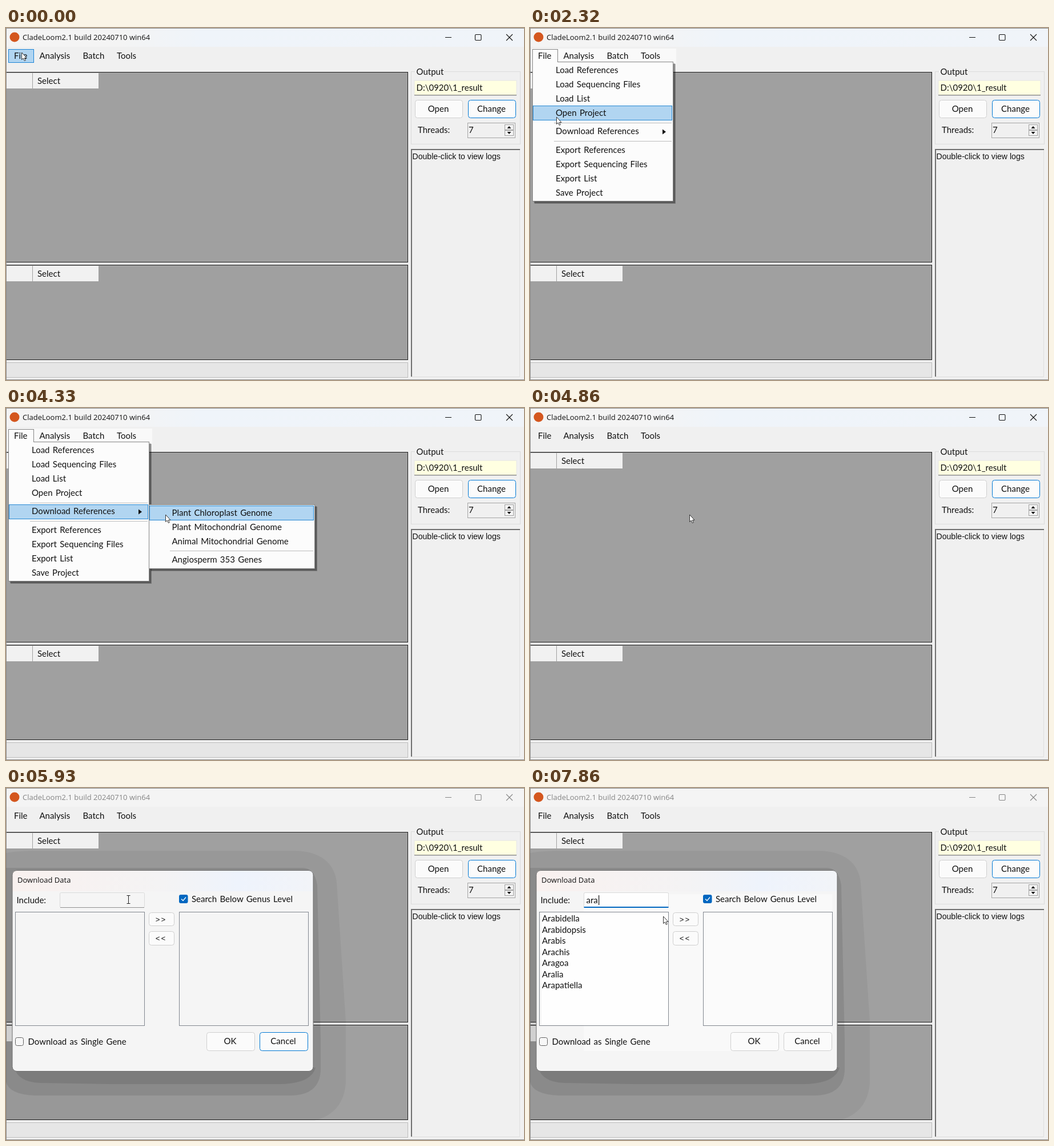
These frames come from a looping animation (907 px wide and 617 px high, 8 s). An HTML page:

```html
<!DOCTYPE html>
<html lang="en">
<head>
<meta charset="utf-8">
<title>Download dialog</title>
<style>
  html, body { margin: 0; width: 100%; height: 100%; overflow: hidden; background: #f0f0f0; }
  svg { display: block; }
  text { font: 15px Lato, sans-serif; word-spacing: 1.5px; fill: #111; }
  .title { font: 13px "Open Sans", sans-serif; word-spacing: 0; }
  .log { font: 14.1px "Liberation Sans", Arial, sans-serif; word-spacing: 0; }
  .mono { font: 13px "Liberation Mono", monospace; letter-spacing: 2px; }
  .mid { text-anchor: middle; }
</style>
</head>
<body>
<svg id="stage" width="907" height="617" viewBox="0 0 907 617"></svg>
<script>
const LOOP = 8000;
const MENU = 500, SUBMENU = 2850, CLOSE = 4860, DIALOG = 4980, TINT = 5230, FOCUS = 6080;
const ACCENT = '#0067c0', HOVER = '#b1d5f1';

// Markup helpers
const text = (x, y, s, cls = '', attrs = '') =>
  `<text x="${x}" y="${y}" class="${cls}" ${attrs}>${s.replace(/</g, '&lt;')}</text>`;
const fill = (x, y, w, h, color, attrs = '') =>
  `<rect x="${x}" y="${y}" width="${w}" height="${h}" fill="${color}" ${attrs}/>`;
const box = (x, y, w, h, color, stroke, r = 0) =>
  fill(x + .5, y + .5, w - 1, h - 1, color, `stroke="${stroke}" rx="${r}"`);
const path = (d, color, stroke = 'none', attrs = '') =>
  `<path d="${d}" fill="${color}" stroke="${stroke}" ${attrs}/>`;
const at = (from, to, markup) => `<g data-from="${from}" data-to="${to}">${markup}</g>`;
const button = (x, y, w, h, label, stroke = '#d0d0d0', cls = 'mid') =>
  box(x, y, w, h, '#fbfbfb', stroke, 4) + text(x + w / 2 - 1, y + h / 2 + 4.7, label, cls);
// Turns [time, ...values] entries into consecutive timed groups
const steps = (list, draw, end = LOOP) =>
  list.map(([t, ...v], i) => at(t, i + 1 < list.length ? list[i + 1][0] : end, draw(...v))).join('');

function titleBar(color) {
  return text(29, 21, 'CladeLoom2.1 build 20240710 win64', 'title', `style="fill:${color}"`) +
    path('M769 16.5H780M876 11L887 22M887 11L876 22', 'none', color, 'stroke-width="1.1"') +
    fill(821.5, 11.5, 10.5, 10, 'none', `stroke="${color}" stroke-width="1.1" rx="1.5"`);
}

function grid(y, h) {
  return box(-1, y, 705, h, '#a0a0a0', '#1c1c1c') +
    fill(1, y + 2, 45, 27, '#f1f1f1') + fill(47, y + 2, 115, 27, '#f1f1f1') +
    text(55, y + 21, 'Select');
}

function mainWindow() {
  const menus = [[14, 'File'], [58.5, 'Analysis'], [134.5, 'Batch'], [194, 'Tools']];
  return fill(0, 0, 907, 617, '#f0f0f0') +
    fill(0, 0, 907, 33, '#f4f4f4') +
    at(0, DIALOG, fill(200, 0, 707, 33, 'url(#sky)') + titleBar('#111')) +
    at(DIALOG, LOOP, titleBar('#858585')) +
    '<circle cx="15" cy="16" r="8.5" fill="#d4571f"/>' +
    grid(77, 334) + grid(415, 167) +
    box(0, 586, 704, 27, '#e6e6e6', '#bdbdbd') +
    box(709, 76, 192, 128, 'none', '#dcdcdc') + fill(716, 74, 51, 5, '#f0f0f0') +
    text(718.5, 82, 'Output') +
    fill(715, 92, 179, 26, '#ffffe1', 'stroke="#e6e6e6"') + fill(715, 117, 179, 1.3, '#858585') +
    text(718.5, 110, 'D:\\0920\\1_result') +
    button(716, 126, 84, 32, 'Open') + button(809, 126, 84, 32, 'Change', '#0078d4') +
    text(721, 184, 'Threads:') +
    box(808, 166, 84, 27, '#f0f0f0', '#a5a5a5') + text(810, 184, '7') +
    box(873, 169, 16, 10, '#f4f4f4', '#a0a0a0') + box(873, 179, 16, 10, '#f4f4f4', '#a0a0a0') +
    path('M877.5 176H884.5L881 172ZM877.5 182H884.5L881 186Z', '#111') +
    path('M710 611V213H900', 'none', '#707070', 'stroke-width="2"') +
    path('M709 611.5H899.5V214', 'none', '#dedede') +
    text(711.5, 229.5, 'Double-click to view logs', 'log') +
    at(0, MENU, box(4, 37, 45, 24, HOVER, '#1c84d6')) +
    at(MENU, CLOSE, fill(3, 36, 253, 41, '#f9f9f9')) +
    at(MENU, CLOSE, box(4, 37, 45, 30, '#fcfcfc', '#858585')) +
    menus.map(([x, s]) => text(x, 54, s)).join('') +
    path('M0 .5H907M.5 0V617M0 616.5H907', 'none', '#8b8b8b');
}

function popup(x, y, w, h) {
  return fill(x + 4, y + 4, w, h, '#000', 'opacity=".25"') +
    fill(x + 3, y + 3, w, h, '#000', 'opacity=".25"') + box(x, y, w, h, '#fcfcfc', '#858585');
}
const labels = (x, items) => items.map(([y, s]) => text(x, y + 5, s)).join('');
const rowMark = (x, y, w) => box(x, y, w, 26, HOVER, '#2688d3');

function fileMenu() {
  const items = [[73.5, 'Load References'], [98.5, 'Load Sequencing Files'], [124, 'Load List'],
    [149, 'Open Project'], [181, 'Download References'], [213.5, 'Export References'],
    [238.5, 'Export Sequencing Files'], [264, 'Export List'], [289, 'Save Project']];
  const subItems = [[183.5, 'Plant Chloroplast Genome'], [208.5, 'Plant Mitochondrial Genome'],
    [234, 'Animal Mitochondrial Genome'], [266, 'Angiosperm 353 Genes']];
  const marks = [[2050, 111], [2200, 136], [2450, 169]];
  return at(MENU, CLOSE,
      popup(4, 59, 247, 245) + fill(5, 58, 43, 3, '#fcfcfc') +
      steps(marks, y => rowMark(5, y, 244), CLOSE) +
      path('M42 166.5H248M42 198.5H248', 'none', '#bcbcbc') +
      labels(45, items) + path('M232 177.5V186.5L238 182Z', '#111')) +
    at(SUBMENU, CLOSE,
      popup(250, 169, 291, 113) + at(3660, CLOSE, rowMark(251, 171, 288)) +
      path('M287 250.5H538', 'none', '#bcbcbc') + labels(290.5, subItems));
}

function dialogShadow() {
  const layers = [
    ['M0 114Q20 110 60 110H505Q572 112 579 165L595 410V515Q592 570 540 583H0Z', .05],
    ['M0 515Q5 537 50 539H500Q549 538 551 495V440L545 170Q540 140 520 140H0Z', .09],
    ['M14 490Q22 516 60 517L180 519H480Q535 518 542 490Z', .1]];
  return layers.map(([d, a]) => path(d, '#000', 'none', `opacity="${a}"`)).join('');
}

function dialog() {
  const frame = 'x="11" y="144.5" width="527" height="352" rx="8"';
  const names = ['Arabidella', 'Arabidopsis', 'Arabis', 'Arachis', 'Aragoa', 'Aralia', 'Arapatiella',
    'Arbutus', 'Arceuthobium', 'Archidendron'];
  const list = n => fill(20, 218, 222, 197, '#fefefe') +
    names.slice(0, n).map((s, i) => text(21, 234 + i * 19.5, s)).join('');
  const typed = [[7270, 'a', 106], [7580, 'ar', 112], [7860, 'ara', 120]];
  const caret = x => fill(x, 188, 1.2, 17, '#111');
  return dialogShadow() + `<rect ${frame} fill="#f5f5f5"/>` +
    at(TINT, LOOP, path('M11 181V152.5Q11 144.5 19 144.5H530Q538 144.5 538 152.5V181Z', 'url(#tint)')) +
    at(FOCUS, LOOP, fill(94, 186, 435, 275, '#f9f9f9')) +
    `<rect ${frame} fill="none" stroke="#6f6f6f"/>` +
    text(20, 166, 'Download Data', 'title') +
    text(18.5, 202, 'Include:') +
    box(94, 183, 149, 27, '#f5f5f5', '#dadada', 2) + fill(95, 209, 147, 1, '#909090') +
    at(FOCUS, LOOP, box(94, 183, 149, 27, '#fefefe', '#dadada', 2) + fill(94.5, 208, 148, 2, ACCENT)) +
    fill(303, 187, 15.5, 15, ACCENT, 'rx="3"') +
    path('M307 194.5L310 197.5L315 191.5', 'none', '#fff', 'stroke-width="1.3"') +
    text(325, 200, 'Search Below Genus Level') +
    at(FOCUS, LOOP, fill(94, 217, 148, 199, '#fbfbfb') + fill(304, 217, 225, 199, '#fbfbfb')) +
    at(7580, 7860, list(10)) + at(7860, LOOP, list(7)) +
    box(16, 217, 227, 200, 'none', '#82878f') + box(303, 217, 227, 200, 'none', '#82878f') +
    button(250, 218, 45, 24, '>>', '#cfcfcf', 'mid mono') +
    button(250, 251, 45, 25, '<<', '#cfcfcf', 'mid mono') +
    box(16, 437, 15, 15, '#f7f7f7', '#626262', 3) +
    text(38.5, 450, 'Download as Single Gene') +
    button(351, 428, 85, 33, 'OK') +
    at(0, FOCUS, button(444, 428, 85, 33, 'Cancel', '#0078d4')) +
    at(FOCUS, LOOP, button(444, 428, 85, 33, 'Cancel')) +
    at(6200, 7000, caret(98)) +
    steps(typed, (s, x) => text(98.5, 202, s) + caret(x));
}

function pointer() {
  const arrow = (x, y) => path('M.5 0V12.5L3.2 10L5.3 14.5L7.3 13.6L5.3 9.4H9Z', '#fff', '#222',
    `stroke-width=".9" transform="translate(${x} ${y})"`);
  const beam = (x, y) => path('M-3 -7H3M0 -7V7M-3 7H3', 'none', '#222',
    `transform="translate(${x + .5} ${y + .5})"`);
  const over = [[0, 27, 43], [1620, 33, 44], [1750, 33, 48], [1900, 34, 64], [2050, 36, 130],
    [2200, 40, 145], [2320, 46, 156], [2450, 53, 168], [2570, 58, 171], [3120, 91, 175],
    [3270, 140, 181], [3390, 190, 183], [3540, 232, 184], [3660, 265, 185], [3780, 277, 185],
    [4330, 279, 187]];
  const inField = [[5380, 239, 194], [5530, 230, 201], [5660, 221, 195], [5930, 214, 195], [6200, 220, 197]];
  return steps(over, arrow, 5380) + steps(inField, beam, 6470) +
    steps([[6470, 230, 222], [6750, 233, 225]], arrow);
}

const stage = document.getElementById('stage');
stage.innerHTML = `<defs>
    <linearGradient id="sky"><stop stop-color="#f4f4f4"/><stop offset=".2" stop-color="#eff4fa"/>
      <stop offset="1" stop-color="#f0f4f9"/></linearGradient>
    <linearGradient id="tint"><stop stop-color="#f9f1ef"/><stop offset=".5" stop-color="#f4f3f4"/>
      <stop offset=".75" stop-color="#eef3fc"/><stop offset="1" stop-color="#f2f4f8"/></linearGradient>
  </defs>` + mainWindow() + fileMenu() + at(DIALOG, LOOP, dialog()) + pointer();

const timed = [...stage.querySelectorAll('[data-from]')].map(node =>
  ({ node, from: +node.dataset.from, to: +node.dataset.to }));

function render() {
  const t = performance.now() % LOOP;
  for (const { node, from, to } of timed)
    node.style.display = t >= from && t < to ? '' : 'none';
  requestAnimationFrame(render);
}
render();
</script>
</body>
</html>
```
